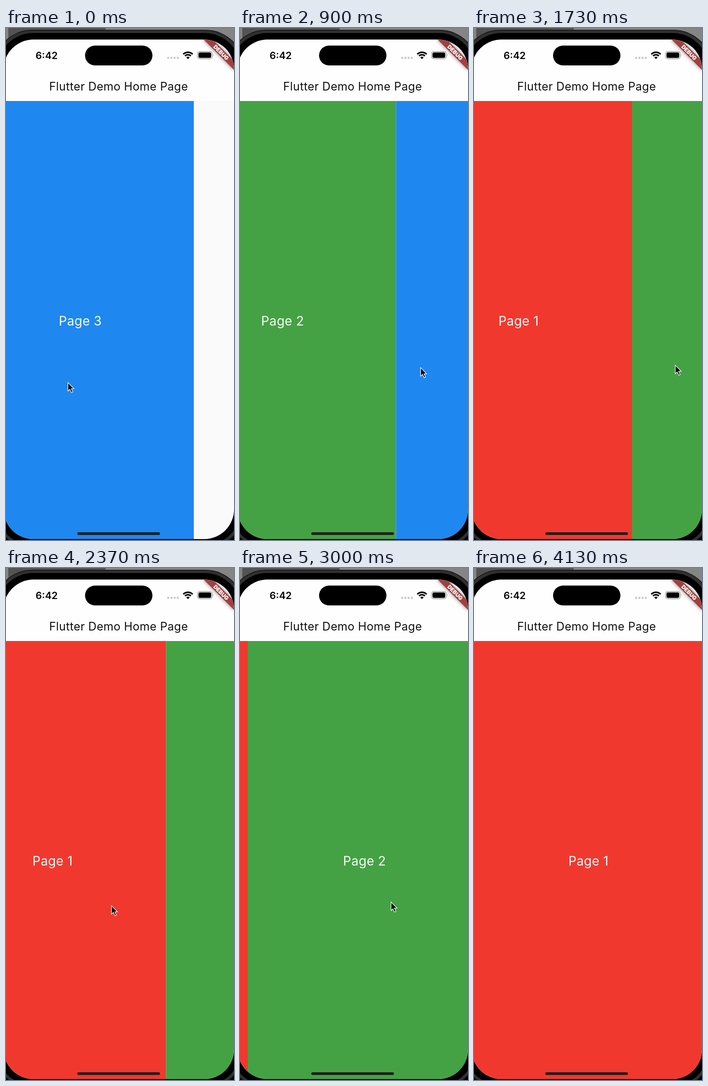
Write an HTML page that moves like this. It is 499 px wide and 1122 px high and loops after 4360 ms.

```html
<!DOCTYPE html>
<html lang="en">
<head>
<meta charset="utf-8">
<title>Page swipe demo</title>
<style>
  html, body { margin: 0; width: 100%; height: 100%; overflow: hidden; background: #000; }
  svg { display: block; width: 499px; height: 1122px; }
  text { font-family: Inter, Roboto, sans-serif; }
  .label { font-size: 28px; letter-spacing: .3px; fill: #fafafa; text-anchor: middle; }
</style>
</head>
<body>
<svg viewBox="0 0 499 1122">
  <defs>
    <clipPath id="screen"><rect x="-5" y="25.500" width="504" height="1094.500" rx="65"/></clipPath>
    <filter id="shadow" x="-20%" y="-150%" width="140%" height="400%">
      <feDropShadow dx="0" dy="0" stdDeviation="4.500" flood-color="#000" flood-opacity=".5"/>
    </filter>
  </defs>

  <!-- Desktop and phone frame -->
  <rect width="499" height="60" fill="#858585"/>
  <rect x="5" width="213" height="30" fill="#535353"/>
  <rect x="-27" y="4" width="548" height="1136" rx="84" fill="#111"/>
  <rect x="-26" y="5.500" width="546" height="1133" rx="83" fill="#303030"/>
  <rect x="-19" y="11" width="532" height="1123" rx="78" fill="#000"/>

  <g clip-path="url(#screen)">
    <rect x="-5" y="25" width="504" height="1096" fill="#fafafa"/>
    <g id="pages"></g>
    <rect x="-5" y="25" width="504" height="135" fill="#fefefe"/>
    <text x="246.500" y="137" font-size="25" letter-spacing=".35" text-anchor="middle" fill="#111">Flutter Demo Home Page</text>

    <!-- Status bar -->
    <text x="89" y="67.500" font-size="21.500" font-weight="600" text-anchor="middle">6:42</text>
    <rect x="173" y="38.500" width="147.500" height="43.500" rx="21.750"/>
    <path d="M355 65.500h22" stroke="#c8c8c8" stroke-width="4.800" stroke-linecap="round" stroke-dasharray="0 7"/>
    <g fill="none" stroke="#000" stroke-width="3.300">
      <path d="M388 57.500a14.500 14.500 0 0 1 20.500 0"/>
      <path d="M391.700 61.300a9.300 9.300 0 0 1 13 0"/>
    </g>
    <path d="M394.500 64.300a5.300 5.300 0 0 1 7.500 0l-3.750 3.900z"/>
    <rect x="419" y="51.500" width="32.500" height="16" rx="5" fill="none" stroke="#999" stroke-width="1.300"/>
    <rect x="421.200" y="53.500" width="28" height="12" rx="3.500"/>
    <path d="M453.300 57q2 2.500 0 5z" fill="#999"/>

    <g transform="translate(470.800 53.700) rotate(45)">
      <rect x="-47" y="-7" width="94" height="14" fill="#a24141" filter="url(#shadow)"/>
      <text y="4.300" font-size="12" font-weight="900" text-anchor="middle" fill="#fff">DEBUG</text>
    </g>
    <rect x="156" y="1105" width="181" height="6" rx="3" fill="#1b1b1b" fill-opacity=".94"/>
  </g>

  <g id="cursor">
    <g id="ring" fill="none" transform="translate(-.7 .5)">
      <circle r="27.800" stroke="#fff" stroke-width="3.600"/>
      <circle r="27.800" stroke="#000" stroke-width="2"/>
    </g>
    <path d="M.6 1V19.500L4.800 15.700L8.200 23L11.300 21.600L8 14.400H13.600Z" stroke="#fff" stroke-width="1.300"/>
  </g>
</svg>
<script>
const LOOP = 4360, STEP = 100 / 3, PAGE_WIDTH = 504, PAGE_LEFT = -5;
const DRAG = 22, DRAG_TIME = 60, PRESS_TIME = 110;
const byId = id => document.getElementById(id);

// Each flick: release time, page index before and after
const flicks = [[723, 2, 1], [1553, 1, 0], [2294, 0, 1], [3000, 1, 0]];

// Pointer path: time, x, y
const path = [
  [0, 135, 776], [90, 112, 780], [400, 225, 768], [633, 308, 755],
  [723, 345, 750], [860, 420, 742], [1233, 185, 755], [1440, 205, 758],
  [1553, 275, 750], [1733, 440, 738], [2190, 340, 743], [2294, 290, 741],
  [2367, 230, 739], [2490, 175, 744], [2860, 300, 736], [3000, 330, 731],
  [3150, 435, 728], [3700, 515, 760]
];

const pages = ['#f1382f', '#44a244', '#1e88f0'].map((color, i) => {
  byId('pages').insertAdjacentHTML('beforeend',
    `<g><rect y="160" width="${PAGE_WIDTH}" height="962" fill="${color}"/>
     <text class="label" x="255.500" y="651.500">Page ${i + 1}</text></g>`);
  return byId('pages').lastElementChild;
});

// Overdamped spring: sum of a slow and a fast decay
const spring = (ms, slow, fast) =>
  slow * Math.exp(-9.08 * ms / 1000) + fast * Math.exp(-22 * ms / 1000);

function scrollAt(t) {
  const flick = flicks.findLast(([release]) => t >= release - DRAG_TIME);
  if (!flick) return 2 * PAGE_WIDTH + spring(t, 331, -243);
  const [release, from, to] = flick;
  const direction = to - from;
  if (t < release) {
    const p = 1 - (release - t) / DRAG_TIME;
    return from * PAGE_WIDTH + direction * DRAG * p * p;
  }
  const rest = PAGE_WIDTH - DRAG;
  return to * PAGE_WIDTH - direction * rest * spring(t - release, 1.7, -.7);
}

function pointerAt(t) {
  const next = path.findIndex(([time]) => time > t);
  if (next < 0) return path.at(-1).slice(1);
  const [t0, x0, y0] = path[next - 1], [t1, x1, y1] = path[next];
  const p = (t - t0) / (t1 - t0);
  return [x0 + (x1 - x0) * p, y0 + (y1 - y0) * p];
}

function render(t) {
  const scroll = scrollAt(t);
  pages.forEach((page, i) =>
    page.setAttribute('transform', `translate(${PAGE_LEFT + i * PAGE_WIDTH - scroll} 0)`));
  byId('cursor').setAttribute('transform', `translate(${pointerAt(t)})`);
  const pressed = flicks.some(([release]) => t >= release - PRESS_TIME && t < release);
  byId('ring').style.display = pressed ? '' : 'none';
}

const start = performance.now();
function tick() {
  const t = (performance.now() - start) % LOOP;
  render(Math.floor((t + 4) / STEP) * STEP);
  requestAnimationFrame(tick);
}
tick();
</script>
</body>
</html>
```
